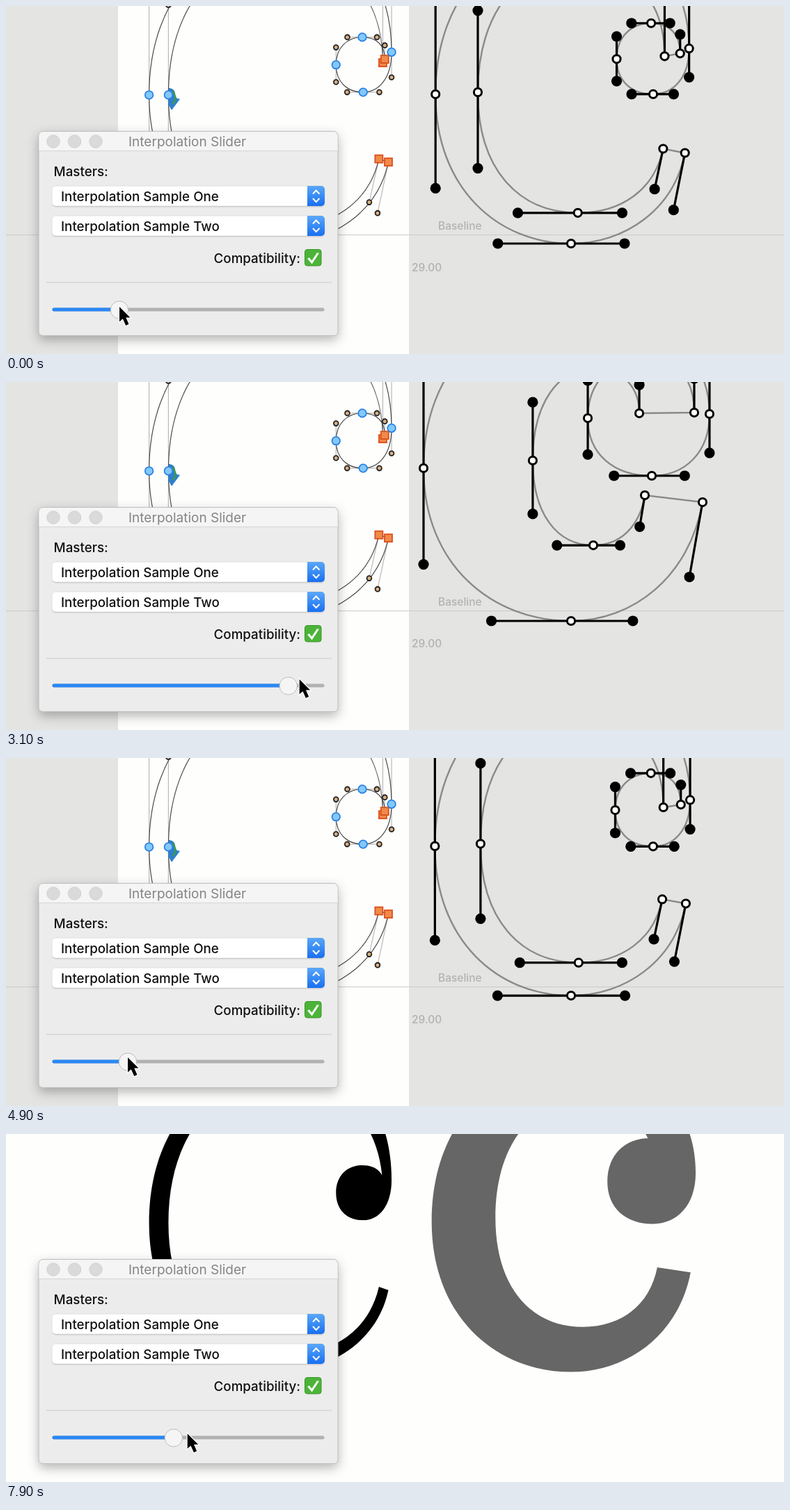
These frames come from a looping animation (1118 px wide and 501 px high, 8 s). An HTML page:

```html
<!DOCTYPE html>
<html lang="en">
<head>
<meta charset="utf-8">
<title>Interpolation Slider</title>
<style>
  html, body { margin: 0; width: 100%; height: 100%; overflow: hidden; background: #fefefd; }
  svg { position: absolute; left: 0; top: 0; display: block; }
  text { font: 500 18.8px Inter, Roboto, "Liberation Sans", sans-serif; fill: #111; }
  .title { font-weight: 400; font-size: 19px; fill: #858585; }
  .hint { font-size: 15.500px; fill: #b2b2b0; }
  #window { filter: drop-shadow(0 6px 8px rgba(0, 0, 0, .28)); }
</style>
</head>
<body>
<svg width="1118" height="501" viewBox="0 0 1118 501">
  <defs>
    <linearGradient id="blue" x1="0" y1="0" x2="0" y2="1">
      <stop offset="0" stop-color="#5aa7f8"/><stop offset="1" stop-color="#1a6ff0"/>
    </linearGradient>
    <g id="popup">
      <rect x="66" y="260" width="392" height="29.500" rx="5" fill="#c9c9c9"/>
      <rect x="66" y="259" width="392" height="29" rx="5" fill="#fff" stroke="#dadada" stroke-width=".8"/>
      <path d="M433 259h20a5 5 0 0 1 5 5v19a5 5 0 0 1-5 5h-20z" fill="url(#blue)"/>
      <path d="M441 270.500l4.700-5 4.700 5M441 277l4.700 5 4.700-5" fill="none" stroke="#fff" stroke-width="1.900"/>
    </g>
  </defs>

  <g id="edit">
    <rect width="161" height="501" fill="#e4e4e2"/>
    <rect x="579" width="539" height="501" fill="#e4e4e2"/>
    <path d="M0 329.500H1118" stroke="#cbcbc9"/>
    <text class="hint" x="621" y="321.500">Baseline</text>
    <text class="hint" x="583" y="382">29.00</text>
    <g id="master"></g>
    <g id="instance"></g>
  </g>
  <g id="solid">
    <path id="masterFill" fill="#000"/>
    <path id="instanceFill" fill="#666"/>
  </g>

  <g id="window">
    <rect x="47" y="180.500" width="430" height="294" rx="6" fill="#ececec" stroke="#bdbdbd"/>
    <path d="M47.500 208v-21a6 6 0 0 1 6-6h417a6 6 0 0 1 6 6v21z" fill="#f5f5f5"/>
    <path d="M47.500 208.500H476.500" stroke="#d6d6d6"/>
  </g>
  <g fill="#dadada" stroke="#cfcfcf" stroke-width=".8">
    <circle cx="68" cy="195" r="9.300"/><circle cx="98.500" cy="195" r="9.300"/><circle cx="129" cy="195" r="9.300"/>
  </g>
  <text class="title" x="176" y="202">Interpolation Slider</text>
  <text x="68.500" y="245">Masters:</text>
  <use href="#popup"/>
  <text x="79" y="280.500">Interpolation Sample One</text>
  <use href="#popup" y="43"/>
  <text x="79" y="323.500">Interpolation Sample Two</text>
  <text x="423" y="370" text-anchor="end">Compatibility:</text>
  <rect x="429.500" y="350.500" width="23.500" height="23.500" rx="3.500" fill="#4bb438" stroke="#3c962c"/>
  <path d="M434.500 363l5 6 9-13.500" fill="none" stroke="#fff" stroke-width="3"/>
  <path d="M58 398H468" stroke="#d5d5d5" stroke-width="1.500"/>
  <g stroke-width="5" stroke-linecap="round">
    <path d="M69 437H455" stroke="#b2b2b2"/>
    <path id="track" stroke="#2a88f5"/>
  </g>
  <circle id="knob" cy="437.500" r="12.700" fill="#f5f5f5" stroke="#bdbdbd"/>
  <path id="cursor" d="M0 0V21.500L4.800 17.200 9.200 27 13.500 25 9.300 15.600H15.500Z"
        fill="#000" stroke="#fff" stroke-width="2.400" paint-order="stroke"/>
</svg>

<script>
const LOOP = 8000, STEP = 100, SOLID_AT = 6500, LAG = 200;
const RISE = 0.63, LEAN = 0.1;   // handle length as a share of the segment
const $ = id => document.getElementById(id);

// kind, x, y, growth in x and y with weight, sideways pull of the next segment.
// side and crown are smooth extremes, tip and joint are corners.
const NODES = [
  ['side', 617, 127, -17, -3, .54],
  ['crown', 812, 342, 0, 2, .47],
  ['tip', 976, 211, 25, -38, 0],
  ['tip', 944, 205, -26, -42, .52],
  ['crown', 822, 297, 22, -62, .6],
  ['side', 679, 124, 78, -11, .57],
  ['crown', 822, -62, 23, 42, .57],
  ['joint', 946, 72, -36, -27, 0],
  ['joint', 969, 68, 20, -24, .65],
  ['crown', 927, 24, -7, -58, .57],
  ['side', 877, 76, -41, -24, .59],
  ['crown', 930, 127, -2, 8, .57],
  ['side', 982, 61, 29, -15, .56],
  ['crown', 830, -105, -15, 0, .565]
];

// Pointer stops: time, x, y; eased in between.
const STOPS = [[720, 163, 433], [1930, 437, 441], [2700, 398, 428], [3400, 437, 428],
  [3525, 437, 428], [4690, 175, 431], [5600, 175, 431], [6300, 165, 433], [6700, 165, 433], [8450, 290, 431]];

function pointer(t) {
  const i = STOPS.findIndex(s => s[0] > t);
  const [t0, x0, y0] = STOPS[Math.max(i - 1, 0)], [t1, x1, y1] = STOPS[i];
  const s = Math.max(0, (t - t0) / (t1 - t0)), e = s * s * (3 - 2 * s);
  return [x0 + (x1 - x0) * e, y0 + (y1 - y0) * e];
}

function handle({ kind, x, y }, to, pull) {
  const dx = to.x - x, dy = to.y - y;
  if (kind === 'crown') return [x + dx * pull, y];
  return [x + (kind === 'tip' ? dx * LEAN : 0), y + dy * RISE];
}

const isCorner = n => n.kind === 'tip' || n.kind === 'joint';

function glyph(weight, shift = 0) {
  const nodes = NODES.map(([kind, x, y, gx, gy, pull]) =>
    ({ kind, pull, x: x + gx * weight + shift, y: y + gy * weight }));
  const arms = [];
  let d = `M${nodes[0].x} ${nodes[0].y}`;
  nodes.forEach((a, k) => {
    const b = nodes[(k + 1) % nodes.length];
    if (isCorner(a) && isCorner(b)) { d += `L${b.x} ${b.y}`; return; }
    const out = handle(a, b, a.pull), into = handle(b, a, a.pull);
    d += `C${out} ${into} ${b.x} ${b.y}`;
    arms.push([a, out], [b, into]);
  });
  return { nodes, arms, d: d + 'Z' };
}

const path = (d, paint) => `<path d="${d}" fill="none" ${paint}/>`;
const dot = (x, y, r, paint = '') => `<circle cx="${x}" cy="${y}" r="${r}" ${paint}/>`;
const square = (x, y) => `<rect x="${x - 5.5}" y="${y - 5.5}" width="11" height="11" fill="#f08a4b" stroke="#dc4f1a" stroke-width="1.8"/>`;
const lines = arms => arms.map(([n, h]) => `M${n.x} ${n.y}L${h}`).join('');

function masterView({ nodes, arms, d }) {
  return path(lines(arms), 'stroke="#b9b9b9" stroke-width="1.2"') +
    path(d, 'stroke="#4c4c4c" stroke-width="1.2"') +
    '<path d="M234 118Q245 119 243 132L250 134 238 150 233 141Z" fill="#2f7fce"/>' +
    path('M240 122L244 133 240 141', 'stroke="#3f9a4a" stroke-width="2.5"') +
    arms.map(([, h]) => dot(...h, 3.4, 'fill="#dcae80" stroke="#222" stroke-width="1.8"')).join('') +
    nodes.map(n => isCorner(n) ? square(n.x, n.y)
      : dot(n.x, n.y, 5.8, 'fill="#83c8fb" stroke="#2c82e0" stroke-width="1.8"')).join('');
}

function instanceView({ nodes, arms, d }) {
  return path(d, 'stroke="#8a8a8a" stroke-width="2.4"') +
    path(lines(arms), 'stroke="#000" stroke-width="3.2"') +
    arms.map(([, h]) => dot(...h, 7.6)).join('') +
    nodes.map(n => dot(n.x, n.y, 5.6, 'fill="#fff" stroke="#000" stroke-width="3"')).join('');
}

const light = glyph(-0.36, -417.5);
$('master').innerHTML = masterView(light);
$('masterFill').setAttribute('d', light.d);

function draw(t) {
  const [knob] = pointer(t - LAG);
  const shape = glyph((knob - 166) / 240), solid = t >= SOLID_AT;
  $('edit').style.display = solid ? 'none' : '';
  $('solid').style.display = solid ? '' : 'none';
  if (solid) $('instanceFill').setAttribute('d', shape.d);
  else $('instance').innerHTML = instanceView(shape);
  $('track').setAttribute('d', `M69 437H${knob}`);
  $('knob').setAttribute('cx', knob);
  $('cursor').setAttribute('transform', `translate(${pointer(t)})`);
}

const begin = performance.now();
let last = -1;
function tick() {
  const t = Math.floor((performance.now() - begin) % LOOP / STEP) * STEP;
  if (t !== last) draw(last = t);
  requestAnimationFrame(tick);
}
tick();
</script>
</body>
</html>
```
